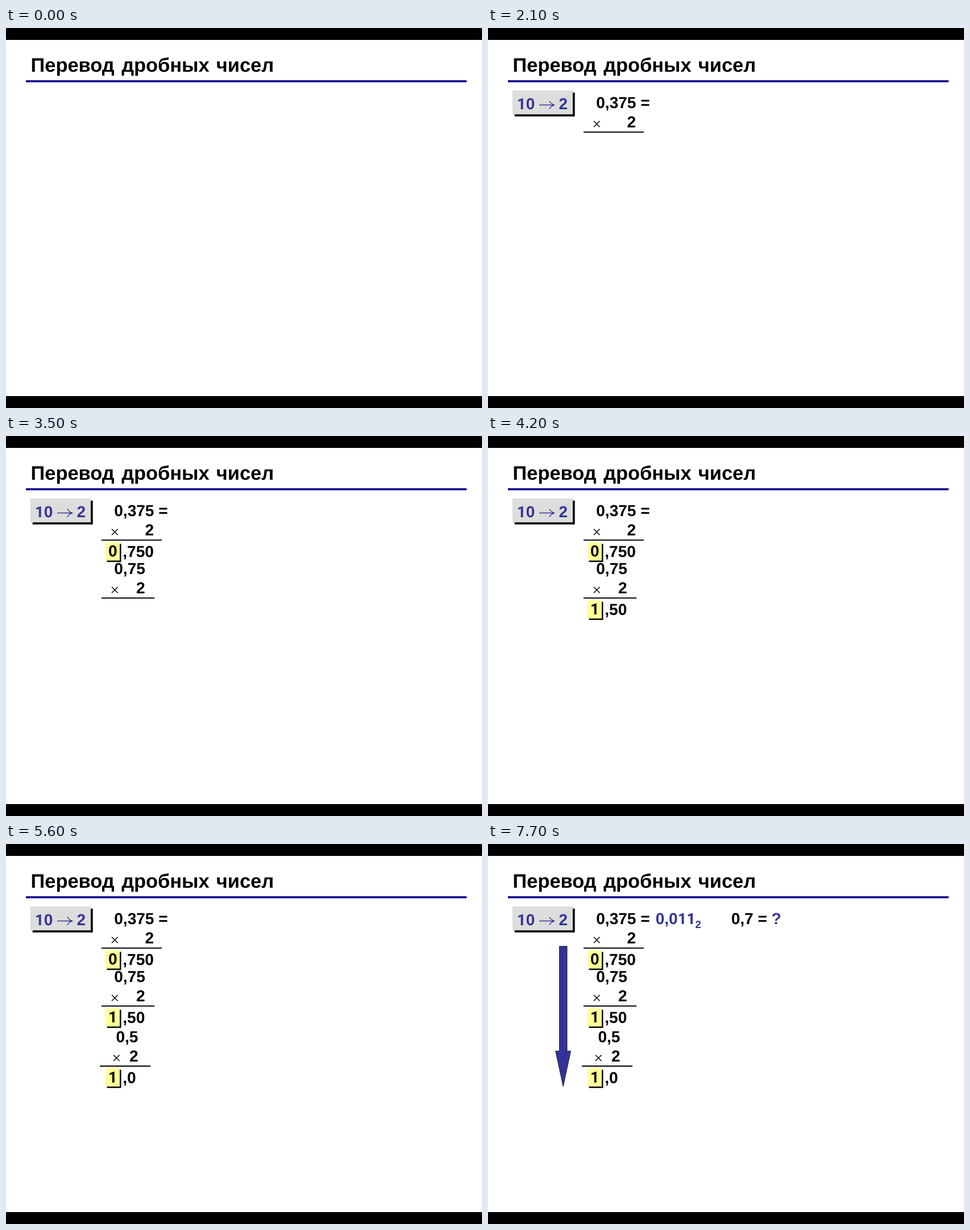
An HTML page that plays this animation: 837 px wide and 669 px high, repeating every 8000 ms.

```html
<!DOCTYPE html>
<html lang="ru">
<head>
<meta charset="utf-8">
<title>Перевод дробных чисел</title>
<style>
html, body { margin: 0; width: 100%; height: 100%; overflow: hidden; background: #fff; }
svg { display: block; width: 837px; height: 669px; }
text { font: bold 28px "Liberation Sans", Arial, sans-serif; white-space: pre; text-rendering: geometricPrecision; }
text.title { font-size: 34.4px; }
.one { font-family: Roboto, sans-serif; font-size: 27.3px; }
.blue { fill: #339; }
.sub { font-size: 18.5px; }
.thin { fill: none; stroke: #000; stroke-width: 1.5; }
</style>
</head>
<body>
<svg viewBox="0 0 837 669">
  <path d="M0 0H837V21H0ZM0 648H837V669H0Z"/>
  <text class="title" y="76.5"><tspan x="43.6">Перевод</tspan> <tspan x="203.2">дробных</tspan> <tspan x="369.8">чисел</tspan></text>
  <path fill="#00008b" d="M35 92H810V95.5H35Z"/>
  <g id="steps"></g>
</svg>
<script>
const STEP = 700, LOOP = 8000;

// The digit 1 is set in a face where it has no foot
const text = (x, y, s, cls = '') =>
  `<text x="${x}" y="${y}" class="${cls}">${s.replace(/1/g, '<tspan class="one">1</tspan>')}</text>`;
const rect = (x, y, w, h, fill) => `<rect x="${x}" y="${y}" width="${w}" height="${h}" fill="${fill}"/>`;
const card = (x, y, w, h, fill, d) => rect(x + d, y + d, w, h, '#000') + rect(x, y, w, h, fill);

// The "× 2" row with the rule under it
const times = (crossX, twoX, y, left, right) =>
  `<path class="thin" d="M${crossX - 5} ${y - 11.5}l10.5 10.5m0 -10.5l-10.5 10.5"/>` +
  text(twoX, y, '2') + rect(left, y + 7, right - left, 2, '#000');

// Product with its integer part highlighted
const product = (y, digit, rest) =>
  card(175, y - 26, 25, 32, '#ff9', 2.5) + text(180, y - 1, digit) + text(205.3, y, rest);

const steps = [
  card(43, 110, 106, 42, '#ddd', 3.7) + text(51, 142.5, '10', 'blue') + text(124.6, 142.5, '2', 'blue') +
    '<path class="thin" style="stroke:#339" d="M90 135.5H116M108 128.5Q111 134 117 135.5Q111 137 108 142.5"/>',
  text(190.3, 141.3, '0,375 ='),
  times(191, 244.6, 175.3, 168, 274),
  product(213.3, '0', ',750'),
  text(190.3, 243.3, '0,75') + times(191, 229, 277.3, 168, 261),
  product(315.3, '1', ',50'),
  text(193.5, 348.7, '0,5') + times(194, 217, 383, 165, 254),
  product(421, '1', ',0'),
  '<path fill="#339" stroke="#000" stroke-width=".8" d="M125.5 180H139V364.5H145.5L132.2 427L118.8 364.5H125.5Z"/>',
  text(294.7, 141.3, '0,011', 'blue') + text(364.6, 148, '2', 'blue sub'),
  text(427.7, 141.3, '0,7 = <tspan class="blue">?</tspan>')
];

const root = document.getElementById('steps');
root.innerHTML = steps.map(s => `<g>${s}</g>`).join('');
const groups = [...root.children];
const start = performance.now();

function draw(now) {
  const shown = Math.floor(Math.max(0, now - start) % LOOP / STEP);
  groups.forEach((g, i) => g.setAttribute('visibility', i < shown ? 'visible' : 'hidden'));
  requestAnimationFrame(draw);
}
draw(start);
</script>
</body>
</html>
```
